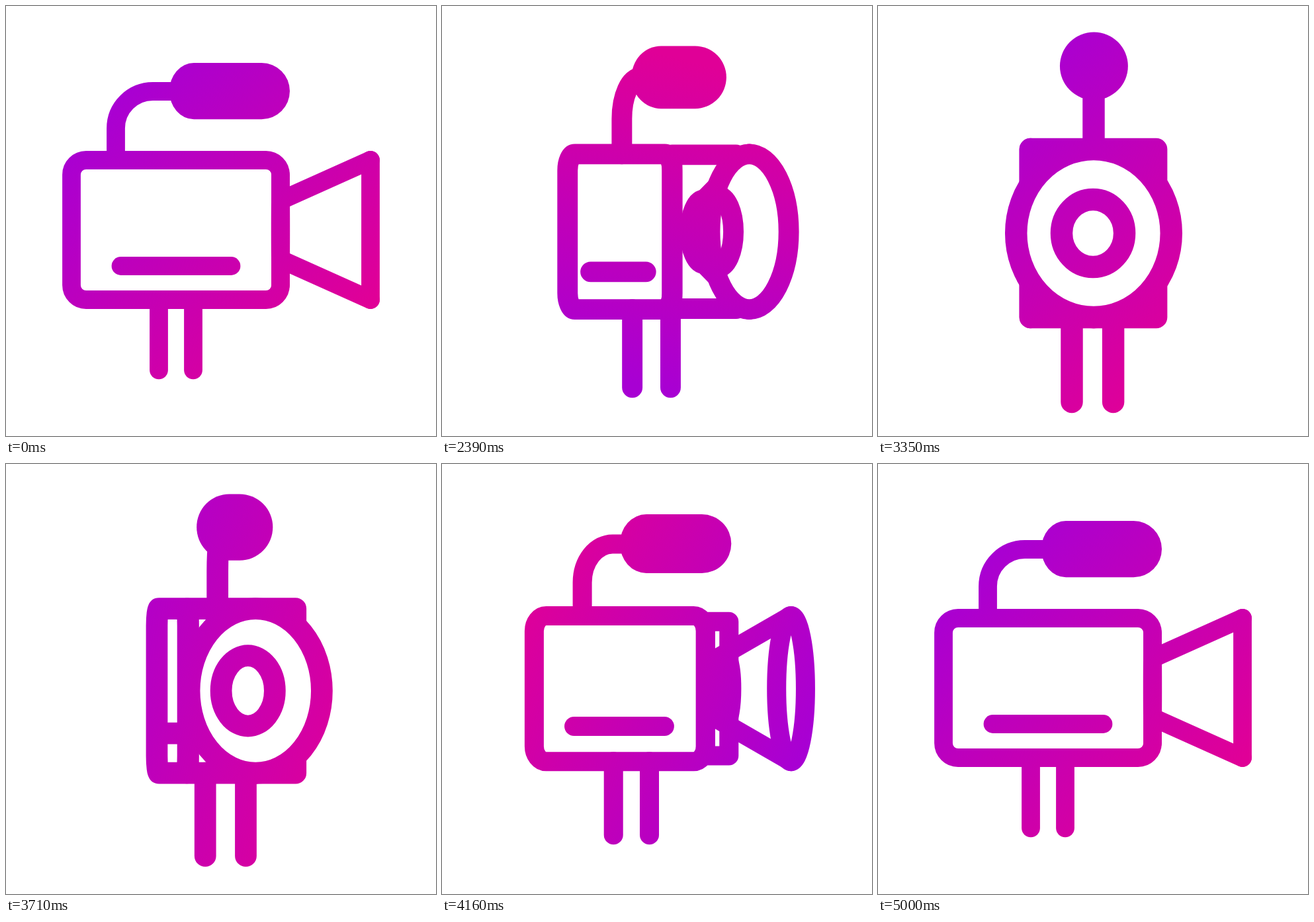
These frames come from a looping animation (650 px wide and 650 px high, 5.03 s). An HTML page with a canvas:

```html
<!DOCTYPE html>
<html lang="en">
<head>
<meta charset="utf-8">
<title>Camera turn</title>
<style>
  html, body { margin: 0; width: 100%; height: 100%; overflow: hidden; background: #fff; }
  canvas { display: block; width: 650px; height: 650px; }
</style>
</head>
<body>
<canvas id="stage" width="650" height="650"></canvas>
<script>
const ctx = document.getElementById('stage').getContext('2d');
const LOOP = 5030, REST = 2030, STEP = 30;
const MID = 24.5;    // height of the lens axis
const HALF = 105.5;  // half height of body and lens rim

// [time, value] keys: turn 0 = side view, 1 = front view
const TURN = [[2000, 0], [2030, .004], [2150, .1], [2260, .3], [2390, .55], [2540, .77], [2700, .92],
  [2900, 1], [3380, 1], [3620, .925], [3980, .607], [4160, .215], [4420, 0]];
const SHIFT = [[2000, 0], [2030, 1.2], [2120, 13], [2220, 31], [2270, 33], [2390, 26.2], [2540, 17],
  [2850, 0], [3180, -4.5], [3350, .5], [3620, 12], [3850, 27], [3930, 29], [3980, 28.5],
  [4160, 17.3], [4430, -3.5], [4560, -7], [4700, -5], [5000, 0]];
const ANGLE = [[2000, 45], [2390, 285], [2850, 405], [3450, 405], [3980, 325], [4420, 45]];

// Smooth interpolation that never overshoots its keys
function track(keys, t) {
  const last = keys.length - 1;
  if (t <= keys[0][0]) return keys[0][1];
  if (t >= keys[last][0]) return keys[last][1];
  const slope = i => (keys[i + 1][1] - keys[i][1]) / (keys[i + 1][0] - keys[i][0]);
  const tangent = i => {
    if (i === 0 || i === last) return 0;
    const a = slope(i - 1), b = slope(i);
    return a * b > 0 ? 2 * a * b / (a + b) : 0;
  };
  let i = 0;
  while (keys[i + 1][0] <= t) i++;
  const [t0, v0] = keys[i], [t1, v1] = keys[i + 1];
  const d = t1 - t0, u = (t - t0) / d, w = 1 - u;
  return v0 * (1 + 2 * u) * w * w + d * tangent(i) * u * w * w
    + v1 * u * u * (3 - 2 * u) - d * tangent(i + 1) * u * u * w;
}

const mix = (a, b, p) => a + (b - a) * p;

function line(x0, y0, x1, y1) {
  ctx.beginPath();
  ctx.moveTo(x0, y0);
  ctx.lineTo(x1, y1);
  ctx.stroke();
}

function ring(x, rx, ry, fill) {
  ctx.beginPath();
  ctx.ellipse(x, MID, Math.max(rx, .3), ry, 0, 0, Math.PI * 2);
  if (fill) {
    ctx.fillStyle = fill;
    ctx.fill();
  }
  ctx.stroke();
}

function paint(p, shift, angle) {
  const scale = 1 + .204 * p;
  ctx.setTransform(1, 0, 0, 1, 0, 0);
  ctx.fillStyle = '#fff';
  ctx.fillRect(0, 0, 650, 650);
  ctx.translate(325 + shift, 314);
  ctx.scale(scale, scale);

  // Gradient stays centred on the stage
  const gx = -shift / scale, gy = 11 / scale, reach = 247 / scale;
  const dx = Math.cos(angle * Math.PI / 180) * reach, dy = Math.sin(angle * Math.PI / 180) * reach;
  const ink = ctx.createLinearGradient(gx - dx, gy - dy, gx + dx, gy + dy);
  ink.addColorStop(0, '#a800d3');
  ink.addColorStop(1, '#e00097');
  ctx.strokeStyle = ink;
  ctx.lineWidth = 27.8;
  ctx.lineCap = ctx.lineJoin = 'round';

  const top = MID - HALF, bottom = MID + HALF;
  const left = mix(-226, -79, p), edge = mix(90, -79, p), right = mix(90, 79, p);

  // Microphone arm
  const stem = mix(-159, .4, p), bend = mix(-103, .4, p);
  ctx.beginPath();
  ctx.moveTo(stem, top);
  ctx.lineTo(stem, -129);
  ctx.ellipse(bend, -129, Math.max(bend - stem, 0), 56, 0, Math.PI, Math.PI * 1.5);
  ctx.lineTo(mix(-65, .4, p), -185);
  ctx.stroke();

  // Microphone
  const micLeft = mix(-78, -42, p), micRight = mix(104, 43.5, p);
  const near = { x: mix(37, 42.6, p), y: 42.6 }, far = { x: 42.6, y: 42.6 };
  ctx.fillStyle = ink;
  ctx.beginPath();
  ctx.roundRect(micLeft, -228, micRight - micLeft, 85.2, [near, far, far, near]);
  ctx.fill();

  // Legs
  for (const [a, b] of [[-94, -27], [-42, 25]]) {
    const x = mix(a, b, p);
    line(x, bottom, x, 236.3);
  }

  // Side panel and its slot
  ctx.beginPath();
  ctx.roundRect(left, top, edge - left, HALF * 2, { x: 22 * (1 - p), y: 22 });
  ctx.stroke();
  line(mix(-151.5, -83, p), 79, mix(15.5, -83, p), 79);

  // Front panel
  const inset = 22 * (1 - p) ** 4;
  ctx.strokeRect(edge, top + inset, Math.max(right - edge, .01), (HALF - inset) * 2);

  // Lens: mount and cone behind, rim and glass in front
  const mount = mix(90, 0, p), rim = mix(226, .4, p);
  ring(mount, p * (28 + 11.5 * p), mix(44.5, 42.4, p));
  for (const side of [-1, 1]) {
    line(rim, MID + side * HALF, mount, MID + side * mix(44.5, 42, p));
  }
  if (p > 0) {
    ring(rim, 97.4 * p, HALF, '#fff');
    const bulge = p * (1 - p);
    ring(mix(90, -.4, p) + 74 * bulge, 39.5 * p, mix(44.5, 42.4, p) + 22 * bulge);
  } else {
    line(rim, top, rim, bottom);
  }
}

function frame(now) {
  const t = now % LOOP;
  const at = t < REST ? 0 : REST + Math.floor((t - REST) / STEP) * STEP;
  paint(track(TURN, at), track(SHIFT, at), track(ANGLE, at));
  requestAnimationFrame(frame);
}

const start = performance.now();
const tick = () => {
  frame.call(null, 0);
};
(function loop() {
  const t = (performance.now() - start) % LOOP;
  const at = t < REST ? 0 : REST + Math.floor((t - REST) / STEP) * STEP;
  paint(track(TURN, at), track(SHIFT, at), track(ANGLE, at));
  requestAnimationFrame(loop);
})();
</script>
</body>
</html>
```
